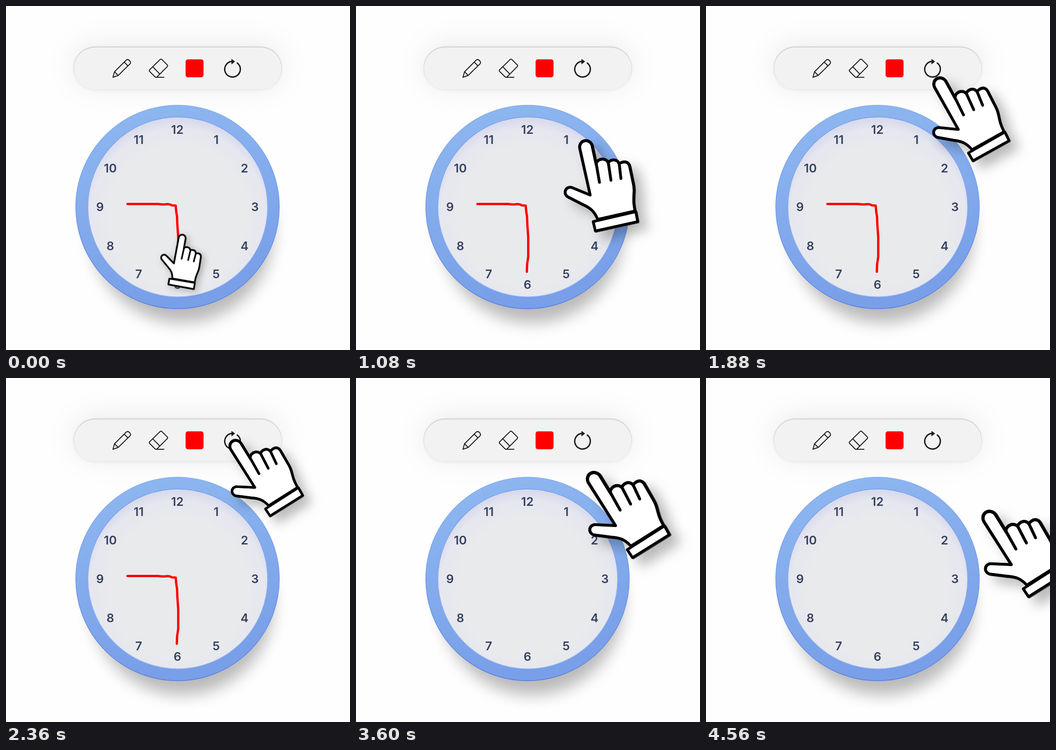
Recreate the animation shown at these times as an HTML page. Size 748 by 748 pixels, loop 8000 ms.

```html
<!DOCTYPE html>
<html lang="en">
<head>
<meta charset="utf-8">
<title>Clock drawing</title>
<style>
  html, body { margin: 0; height: 100%; overflow: hidden; background: #fefefe; }
  #scene, #hand { position: absolute; left: 0; top: 0; width: 748px; height: 748px; }
  #numbers { font: 600 26px Inter, sans-serif; fill: #36415f; text-anchor: middle; }
  .bar { filter: drop-shadow(0 -.7px 1.2px #0004) drop-shadow(0 2px 5px #0000000d) drop-shadow(0 -6px 30px #00000014); }
  .line { fill: none; stroke: #1c1c1c; stroke-width: 2; stroke-linecap: round; stroke-linejoin: round; }
  .ink { fill: none; stroke: #f00; stroke-width: 5; stroke-linecap: round; stroke-linejoin: round; }
  #pose {
    position: absolute; left: -80px; top: -30px; width: 160px; height: 220px; transform-origin: 80px 30px;
    fill: #fff; stroke: #000; stroke-width: 5.5; stroke-linecap: round; stroke-linejoin: round;
  }
</style>
</head>
<body>
<svg id="scene" viewBox="0 0 748 748">
  <defs>
    <linearGradient id="rim" x1="0" y1="0" x2=".25" y2="1">
      <stop stop-color="#8fb9f1"/><stop offset="1" stop-color="#789fe8"/>
    </linearGradient>
    <linearGradient id="edge" x1="0" y1="0" x2="0" y2="1">
      <stop stop-color="#86aeed"/><stop offset="1" stop-color="#587ddd"/>
    </linearGradient>
    <linearGradient id="lip" x1="0" y1="0" x2="0" y2="1">
      <stop stop-color="#6d93eb"/><stop offset="1" stop-color="#a9c2f4"/>
    </linearGradient>
    <radialGradient id="face" cy=".55" r=".55">
      <stop offset=".7" stop-color="#e9eaec"/><stop offset=".88" stop-color="#e6e7ef"/><stop offset="1" stop-color="#d5d8ec"/>
    </radialGradient>
    <filter id="soft" x="-20%" y="-20%" width="140%" height="140%"><feGaussianBlur stdDeviation="17"/></filter>
  </defs>

  <rect class="bar" x="148" y="90" width="451" height="91.5" rx="45.7" fill="#f2f2f2"/>
  <g class="line">
    <path d="M232.5 155 236 143 261 118Q264.5 114.5 268.5 118.5T269.5 126L244 151ZM257 122 265 130M236 143 244 151"/>
    <path d="M312.5 138.5 335 116.500Q337 114.500 339 116.500L350.500 128Q352.500 130 350.500 132L328 154.500Q326 156 324 154L312.500 142.500Q310.500 140.500 312.500 138.500ZM319 132 334.500 148M326 155H343.500"/>
    <path d="M503 124A17 17 0 1 1 491 120.500" stroke-width="3"/>
    <path d="M491 116 497.500 120.800 491 126Z" fill="#1c1c1c" stroke-width="1"/>
  </g>
  <rect x="390.500" y="116" width="39" height="39" rx="5" fill="#f00"/>

  <circle cx="383" cy="492" r="197" fill="#000" opacity=".27" filter="url(#soft)"/>
  <circle cx="373" cy="437" r="221.3" fill="url(#rim)" stroke="url(#edge)" stroke-width="1.4"/>
  <circle cx="373.5" cy="436.7" r="195.4" fill="url(#face)" stroke="url(#lip)" stroke-width="1.3"/>
  <g id="numbers"></g>
  <path id="ink" class="ink" d="M264 430.5H330Q343 432 349 431T361 433.5L369 434 370 446 372 459 372.5 475 374.5 503V545L372 562 371.5 578"/>
</svg>

<div id="hand">
  <svg id="pose" viewBox="-80 -30 160 220">
    <g transform="translate(-460 -437)">
      <path d="M443 527 448.5 437A11.8 11.8 0 0 1 472 438L470 474C472 464 491 464 493 477C496 472 512 472 512.5 485C514 482 531 480 531 494L530 527C530 547 521 553 520.5 582L444 578C442 560 436 551 424 541L401 519A9.7 9.7 0 0 1 414 504Z"/>
      <path d="M470.5 472 467 508M493 478 489.500 510M512.500 486 509 512" fill="none"/>
      <path d="M434 580 521.500 584 520.500 605 433 600Z"/>
    </g>
  </svg>
</div>
<script>
const LOOP = 8000, STEP = 40, CLEAR = 2440;
// time, fingertip x, fingertip y, scale, rotation, tilt towards the viewer
const keys = [
  [0, 383, 504, .64, 7, 0],
  [640, 460, 437, 1, 0, 0],
  [1440, 515, 211, 1.232, -27.2, 1],
  [2360, 499, 148, 1.1, -35.1, 1],
  [2440, 498.5, 147.5, 1.095, -35.3, 1],
  [2920, 498, 150, 1.175, -36.1, 1],
  [3600, 517, 219.5, 1.238, -35, 1],
  [4560, 616, 304, 1.244, -35.2, 1],
];
const el = id => document.getElementById(id);

for (let n = 1; n <= 12; n++) {
  const a = n * Math.PI / 6;
  el('numbers').innerHTML +=
    `<text x="${372.7 + 168.5 * Math.sin(a)}" y="${446.3 - 168.5 * Math.cos(a)}">${n}</text>`;
}

const slope = (i, c) => (keys[i + 1][c] - keys[i][c]) / (keys[i + 1][0] - keys[i][0]);

// Monotone tangent: harmonic mean of the neighbouring slopes
function tangent(i, c) {
  if (i === 0) return slope(0, c);
  if (i === keys.length - 1) return slope(i - 1, c);
  const a = slope(i - 1, c), b = slope(i, c);
  return a * b > 0 ? 2 * a * b / (a + b) : 0;
}

function valueAt(t, c) {
  const last = keys[keys.length - 1];
  if (t >= last[0]) return last[c];
  const i = keys.findIndex(k => k[0] > t) - 1;
  const [p, q] = [keys[i], keys[i + 1]];
  const d = q[0] - p[0], u = (t - p[0]) / d, v = 1 - u;
  return v * v * (1 + 2 * u) * p[c] + u * u * (3 - 2 * u) * q[c]
    + d * u * v * (v * tangent(i, c) - u * tangent(i + 1, c));
}

function draw(now) {
  const t = Math.floor(now % LOOP / STEP) * STEP;
  const [x, y, s, r, tilt] = [1, 2, 3, 4, 5].map(c => valueAt(t, c));
  const lift = s - .4;
  // The tilt stretches the hand and shrinks it towards the cuff
  el('pose').style.transform = `translate(${x}px, ${y}px) rotate(${r}deg)`
    + ` matrix3d(${s},0,0,0, 0,${s * (1 + .07 * tilt)},0,${.0009 * tilt}, 0,0,1,0, 0,0,0,1)`;
  el('hand').style.filter = `drop-shadow(${2.5 * lift}px ${2 * lift}px 0 #444)`
    + ` drop-shadow(${24 * lift}px ${20 * lift}px ${5 + 10 * lift}px #0004)`;
  el('ink').style.display = t < CLEAR ? '' : 'none';
}

const start = performance.now();
(function tick() {
  draw(performance.now() - start);
  requestAnimationFrame(tick);
})();
</script>
</body>
</html>
```
